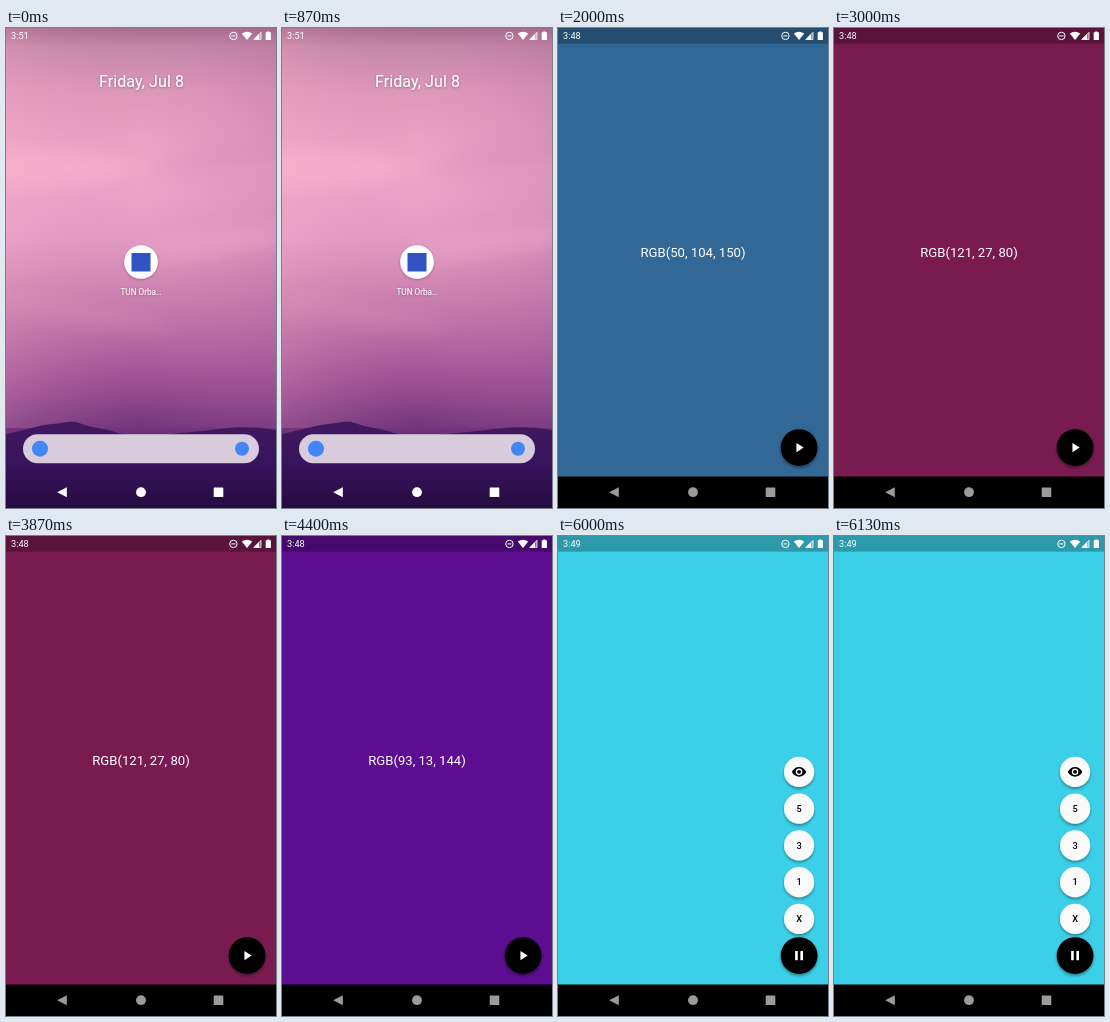
Write an HTML page that moves like this. It is 270 px wide and 480 px high and loops after 6.99 s.

```html
<!DOCTYPE html>
<html lang="en">
<head>
<meta charset="utf-8">
<title>Random colour app</title>
<style>
  html, body { margin: 0; width: 100%; height: 100%; overflow: hidden; background: #000; }
  svg { display: block; width: 100vw; height: 100vh; font-family: Roboto, sans-serif; }
  text { fill: #fff; }
  .mid { text-anchor: middle; }
  .mini circle { fill: #fafafa; }
  .mini text { fill: #000; font-size: 9.2px; font-weight: 500; }
</style>
</head>
<body>
<svg viewBox="0 0 270 480">
  <defs>
    <linearGradient id="sky" x2="0" y2="1">
      <stop offset="0" stop-color="#a56d89"/>
      <stop offset=".04" stop-color="#c587a6"/>
      <stop offset=".13" stop-color="#dd98b8"/>
      <stop offset=".29" stop-color="#eda8c7"/>
      <stop offset=".44" stop-color="#e39bc2"/>
      <stop offset=".56" stop-color="#cb80b0"/>
      <stop offset=".67" stop-color="#b0639e"/>
      <stop offset=".76" stop-color="#934a8c"/>
      <stop offset=".84" stop-color="#70327b"/>
      <stop offset="1" stop-color="#3a165a"/>
    </linearGradient>
    <linearGradient id="side">
      <stop offset="0" stop-color="#ffb4cc" stop-opacity=".2"/>
      <stop offset=".5" stop-color="#c878ac" stop-opacity="0"/>
      <stop offset="1" stop-color="#a45c9c" stop-opacity=".22"/>
    </linearGradient>
    <linearGradient id="hill" x2="0" y2="1">
      <stop offset="0" stop-color="#41195f"/>
      <stop offset=".5" stop-color="#38135b"/>
      <stop offset="1" stop-color="#260b41"/>
    </linearGradient>
    <filter id="blur" x="-50%" y="-100%" width="200%" height="300%"><feGaussianBlur stdDeviation="9"/></filter>
    <filter id="shadow" x="-30%" y="-30%" width="160%" height="170%">
      <feDropShadow dx="0" dy="1.8" stdDeviation="1.8" flood-opacity=".4"/>
    </filter>
    <filter id="glow" x="-20%" y="-30%" width="140%" height="170%">
      <feDropShadow dx="0" dy=".6" stdDeviation=".9" flood-opacity=".35"/>
    </filter>
  </defs>

  <g id="home">
    <rect width="270" height="480" fill="url(#sky)"/>
    <rect width="270" height="400" fill="url(#side)"/>
    <g filter="url(#blur)" opacity=".3">
      <ellipse cx="30" cy="140" rx="90" ry="22" fill="#ffbdd4"/>
      <ellipse cx="215" cy="215" rx="90" ry="13" fill="#f6b3d2" transform="rotate(-9 215 215)"/>
      <ellipse cx="225" cy="130" rx="80" ry="15" fill="#d086b0" transform="rotate(-9 225 130)"/>
      <ellipse cx="70" cy="285" rx="100" ry="12" fill="#e093bd" transform="rotate(8 70 285)"/>
    </g>
    <path d="M0 406C20 402 30 398 46 396S66 392 76 396 98 400 112 405 140 410 160 407 188 404 205 402 240 397 270 402V480H0Z" fill="url(#hill)"/>
    <text class="mid" x="135.5" y="59" font-size="16" letter-spacing=".1" filter="url(#glow)">Friday, Jul 8</text>
    <circle cx="135" cy="234" r="16.8" fill="#fff" filter="url(#glow)"/>
    <rect x="125.5" y="225" width="19" height="18.5" fill="#3153c4"/>
    <text class="mid" x="135" y="267" font-size="8.2" filter="url(#glow)">TUN Orba…</text>
    <rect x="17" y="406.3" width="236" height="29" rx="14.5" fill="#d8cbdc"/>
    <circle cx="34" cy="420.7" r="8" fill="#4285f4"/>
    <circle cx="236" cy="420.7" r="7" fill="#4285f4"/>
  </g>

  <g id="app">
    <rect id="fill" width="270" height="449"/>
    <rect width="270" height="15.7" opacity=".26"/>
    <rect y="448.5" width="270" height="31.5"/>
    <text id="label" class="mid" x="135" y="229.4" font-size="13.13"></text>
    <g id="menu"></g>
    <circle cx="241.1" cy="419.6" r="18.4" filter="url(#shadow)"/>
    <path id="symbol" fill="#fff" transform="translate(233.2 411.7) scale(.656)"/>
  </g>

  <text id="clock" x="5" y="11.2" font-size="9.2"></text>
  <g fill="#fff">
    <circle cx="227.4" cy="7.9" r="3.7" fill="none" stroke="#fff"/>
    <path d="M225.4 7.4h4v1h-4z"/>
    <path d="M235.8 5.6Q241 1.8 246.2 5.6L241 12Z"/>
    <path d="M247.3 11.8L255.2 3.9V11.8Z" opacity=".4"/>
    <path d="M247.3 11.8L253 6.1V11.8Z"/>
    <path d="M255 4.3V11.4H248.2Z" fill="none" stroke="#fff" stroke-width=".7"/>
    <path d="M261.2 3.4h2.2v.9h1.5v7.7h-5.2V4.3h1.5z"/>
  </g>
  <g id="nav">
    <path d="M51.2 464.2L60.8 459.2V469.2Z"/>
    <circle cx="135" cy="464.2" r="4.9"/>
    <rect x="207.7" y="459.4" width="9.6" height="9.6" rx=".5"/>
  </g>
</svg>
<script>
const $ = id => document.getElementById(id);
const LOOP = 6990, SLIDE = 1000;
const PLAY = "M8 5v14l11-7z", PAUSE = "M6 19h4V5H6zM14 5v14h4V5z";
const EYE = "M12 4.5C7 4.5 2.73 7.61 1 12c1.73 4.39 6 7.5 11 7.5s9.27-3.11 11-7.5c-1.73-4.39-6-7.5-11-7.5z" +
  "M12 17a5 5 0 1 1 0-10 5 5 0 0 1 0 10zm0-8a3 3 0 1 0 0 6 3 3 0 0 0 0-6z";

const slides = [
  { time: "3:51" },
  { time: "3:48", rgb: [33, 165, 46], label: true },
  { time: "3:48", rgb: [50, 104, 150], label: true },
  { time: "3:48", rgb: [121, 27, 80], label: true },
  { time: "3:48", rgb: [93, 13, 144], label: true },
  { time: "3:48", rgb: [132, 109, 172], label: true, open: true },
  { time: "3:49", rgb: [60, 208, 232], open: true }
];

$("menu").innerHTML = ["", "5", "3", "1", "X"].map((name, i) => {
  const y = 235.9 + i * 36.75;
  const face = name
    ? `<text class="mid" x="241.1" y="${y + 3.3}">${name}</text>`
    : `<path d="${EYE}" fill-rule="evenodd" transform="translate(233.2 ${y - 7.9}) scale(.656)"/>`;
  return `<g class="mini"><circle cx="241.1" cy="${y}" r="15.1" filter="url(#shadow)"/>${face}</g>`;
}).join("");

const show = (id, on) => $(id).setAttribute("display", on ? "inline" : "none");

let current = -1;
function render(now) {
  const index = Math.floor((now % LOOP) / SLIDE);
  if (index !== current) {
    current = index;
    const { time, rgb, label, open } = slides[index];
    show("home", !rgb);
    show("app", rgb);
    show("menu", open);
    $("clock").textContent = time;
    $("nav").setAttribute("fill", rgb ? "#9b9b9b" : "#fff");
    if (rgb) $("fill").setAttribute("fill", `rgb(${rgb})`);
    $("label").textContent = label ? `RGB(${rgb.join(", ")})` : "";
    $("symbol").setAttribute("d", open ? PAUSE : PLAY);
  }
}

const start = performance.now();
function tick() {
  render(performance.now() - start);
  requestAnimationFrame(tick);
}
tick();
</script>
</body>
</html>
```
